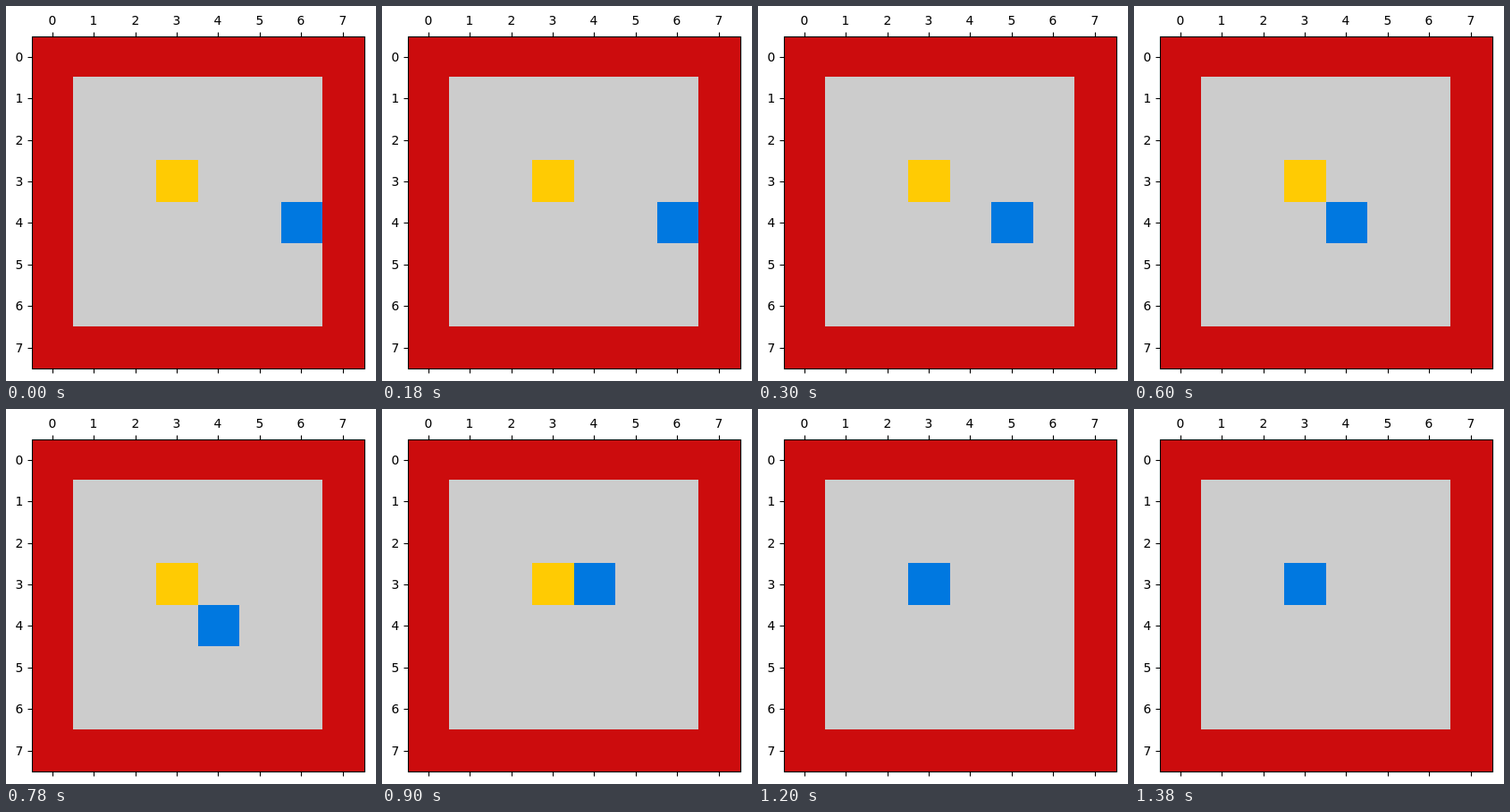
An HTML page with a canvas that plays this animation: 414 by 419 pixels, repeating every 1.5 s.

```html
<!DOCTYPE html>
<html lang="en">
<head>
<meta charset="utf-8">
<title>Grid walk</title>
<style>
html, body { margin: 0; width: 100%; height: 100%; overflow: hidden; background: #fff; }
canvas { display: block; }
</style>
</head>
<body>
<canvas id="stage" width="414" height="419"></canvas>
<script>
const ctx = document.getElementById('stage').getContext('2d');
const STEP = 300;
const SIZE = 8;
const CELL = 46.5;
const PITCH = 46.4;
const PLOT = { left: 29, top: 34, right: 401, bottom: 405 };
const GOAL = [3, 3];
const PATH = [[6, 4], [5, 4], [4, 4], [4, 3], [3, 3]];

const edgeX = col => Math.floor(29 + col * CELL);
const edgeY = row => Math.floor(33 + row * CELL);

function fillCells(col, row, count, color) {
  const x = edgeX(col), y = edgeY(row);
  ctx.fillStyle = color;
  ctx.fillRect(x, y, edgeX(col + count) - x, edgeY(row + count) - y);
}

function line(x1, y1, x2, y2) {
  ctx.beginPath();
  ctx.moveTo(x1, y1);
  ctx.lineTo(x2, y2);
  ctx.stroke();
}

function drawAxes() {
  const { left, top, right, bottom } = PLOT;
  ctx.strokeStyle = ctx.fillStyle = '#000';
  ctx.lineWidth = 1.11;
  ctx.strokeRect(left + 0.5, top + 0.5, right - left, bottom - top);
  ctx.font = '13.89px "DejaVu Sans", sans-serif';
  ctx.textBaseline = 'alphabetic';
  ctx.textAlign = 'center';
  for (let i = 0; i < SIZE; i++) {
    const x = Math.floor(52.3 + i * PITCH) + 0.5;
    const y = Math.floor(57.2 + i * PITCH) + 0.5;
    line(x, top + 0.5, x, top - 4.5);
    line(x, bottom + 0.5, x, bottom + 5.5);
    line(left + 0.5, y, left - 4.5, y);
    ctx.fillText(i, x - 0.5, 21);
    ctx.fillText(i, 15, y + 4.5);
  }
}

function draw(time) {
  const [col, row] = PATH[Math.floor(time / STEP) % PATH.length];
  ctx.fillStyle = '#fff';
  ctx.fillRect(0, 0, 414, 419);
  ctx.fillStyle = '#cc0c0d';
  ctx.fillRect(PLOT.left, PLOT.top, PLOT.right - PLOT.left, PLOT.bottom - PLOT.top);
  fillCells(1, 1, SIZE - 2, '#cccccc');
  fillCells(...GOAL, 1, '#ffcb03');
  fillCells(col, row, 1, '#0078e0');
  drawAxes();
}

const start = performance.now();
function tick() {
  draw(performance.now() - start);
  requestAnimationFrame(tick);
}
tick();
</script>
</body>
</html>
```
